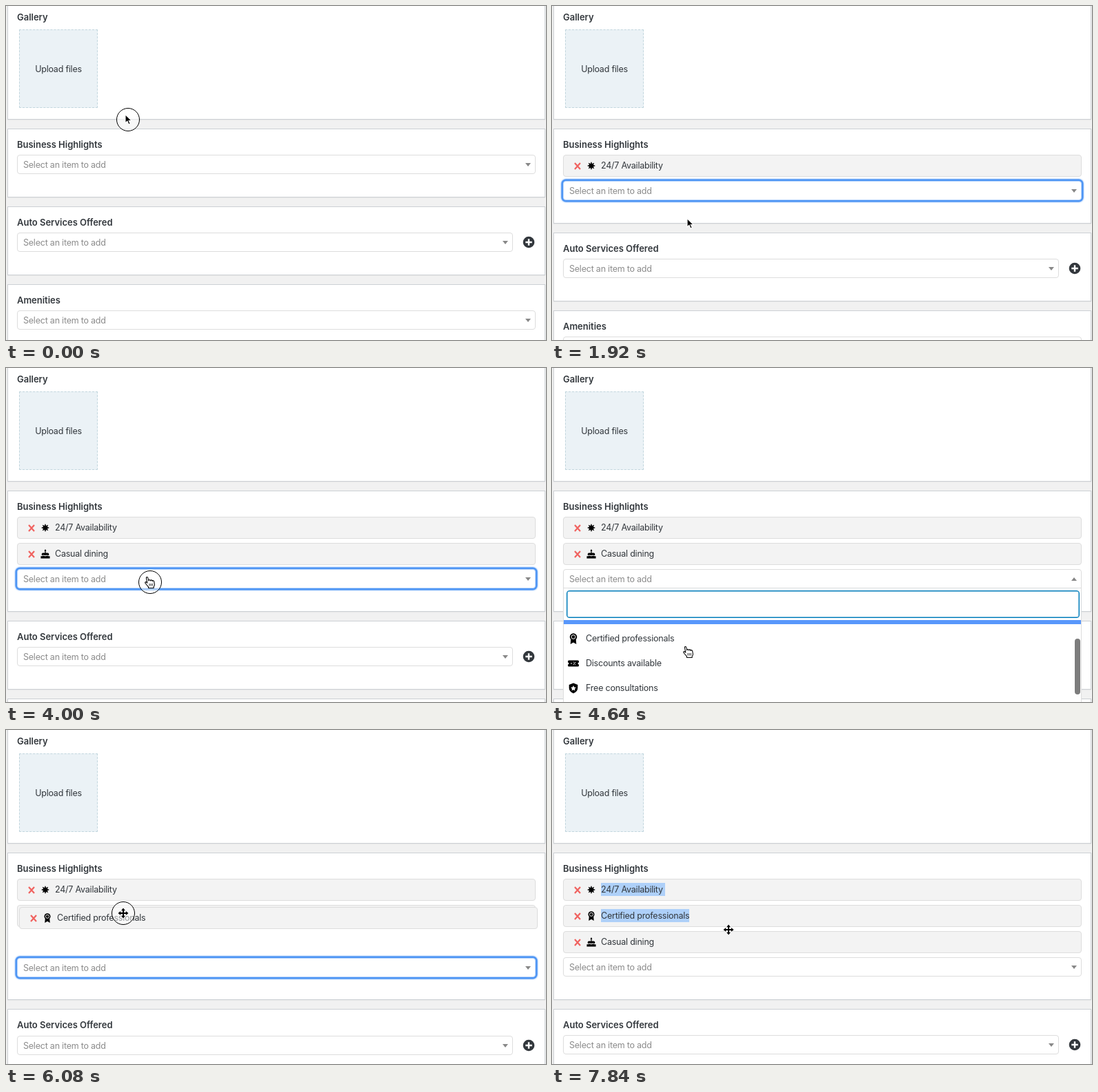
Recreate the animation shown at these times as an HTML page. Size 783 by 485 pixels, loop 8 s.

```html
<!DOCTYPE html>
<html lang="en">
<head>
<meta charset="utf-8">
<title>Listing editor</title>
<style>
  html, body { margin: 0; width: 100%; height: 100%; overflow: hidden; }
  body { position: relative; background: #f1f1f1; color: #32373c;
    font: 12.5px/28px Inter, Roboto, "Liberation Sans", sans-serif; letter-spacing: -.22px; }
  #stage { position: absolute; left: 0; top: 0; width: 783px; height: 485px; overflow: hidden; }
  #stage * { box-sizing: border-box; white-space: nowrap; }
  .panel, .panel > *, .select, .item, .drop, .search, .list, .row, .thumb, .icon, .cross, #pointer, #ring
    { position: absolute; }
  .panel { left: 2px; width: 780px; height: 100px; background: #fff; border: 1px solid #ccd0d4;
    box-shadow: 0 1px 1px rgba(0,0,0,.04); }
  .panel h2 { left: 13px; top: 8px; margin: 0; font-size: 13px; font-weight: 600; letter-spacing: -.02px; }
  .upload { left: 16px; width: 114px; height: 114px; border: 1px dashed #c2d6de; background: #ebf2f6;
    text-align: center; line-height: 113px; }
  .select { left: 16px; width: 752px; height: 28px; padding-left: 8px; border: 1px solid #ddd; border-radius: 4px;
    background: #fff; color: #8c8c8c; line-height: 28px; }
  .panel .select { left: 13px; top: 37px; }
  .panel .short { width: 719px; }
  .select::after { content: ""; position: absolute; right: 6px; top: 11px; border: 4px solid transparent;
    border-top: 5px solid #888; border-bottom: 0; }
  .select.open { border-radius: 4px 4px 0 0; }
  .select.open::after { border-top: 0; border-bottom: 5px solid #888; }
  .select.focus { border-color: #b9d5fb; box-shadow: 0 0 0 2.5px #4f96f4, 0 0 2px 3px #8dbcfa; }
  .plus { left: 746px; top: 43px; width: 18px; height: 18px; }
  .item { left: 16px; width: 752px; height: 32px; border: 1px solid #ddd; border-radius: 4px; background: #f3f3f3; }
  .item span { position: absolute; left: 54px; top: 5px; height: 19px; line-height: 19px; }
  .item .icon { left: 33px; top: 8px; width: 14px; height: 14px; }
  .item.marked span { background: #aed0f9; }
  .cross { left: 15px; top: 10px; width: 10px; height: 11px; }
  .drop { left: 16px; width: 752px; height: 252px; border: 1px solid #ddd; background: #fff; }
  .search { left: 4px; top: 3px; width: 744px; height: 40px; border: 1px solid #007cba; border-radius: 4px;
    box-shadow: inset 0 0 0 .5px #007cba; }
  .list { left: 0; top: 46px; width: 750px; height: 200px; overflow: hidden; }
  .row { left: 0; width: 750px; height: 30px; padding-left: 32px; line-height: 30px; }
  .row.hot { background: #5897fb; color: #fff; }
  .row .icon { left: 6px; top: 7px; width: 16px; height: 16px; color: #000; }
  .icon { color: #000; }
  .thumb { right: 1px; width: 8px; height: 81px; border-radius: 4px; background: #7d7d7d; }
  #ring { width: 34px; height: 34px; margin: -17px; border: 1px solid #000; border-radius: 50%;
    background: rgba(255,255,255,.5); }
  #pointer { width: 20px; height: 20px; margin: -10px; overflow: visible; }
</style>
</head>
<body>
<svg width="0" height="0" style="position:absolute">
  <symbol id="sun" viewBox="0 0 16 16">
    <circle cx="8" cy="8" r="4"/>
    <path d="M8 2v12M2 8h12M3.8 3.8l8.4 8.4M12.2 3.8l-8.4 8.4" stroke="#000" stroke-width="1.6"/>
  </symbol>
  <symbol id="cake" viewBox="0 0 16 16">
    <path d="M8 0l1.3 2.3a1.4 1.4 0 1 1-2.6 0zM7.3 4.5h1.4v1.7H12a2 2 0 0 1 2 2v1.6q-1.7 1.4-3.2-.4q-2.8 2-5.6 0q-1.500 1.800-3.200.4V8.200a2 2 0 0 1 2-2h3.300z"/>
    <path d="M.5 11.600q2.600.6 4.200-.7q3.300 1.800 6.600 0q1.600 1.300 4.200.7V15.500H.5z"/>
  </symbol>
  <symbol id="ribbon" viewBox="0 0 16 16">
    <path d="M4.300 9l-.6 7L8 13.500l4.300 2.500-.6-7z"/>
    <circle cx="8" cy="5.500" r="5.200"/>
    <circle cx="8" cy="5.500" r="2.900" fill="none" stroke="#fff"/>
  </symbol>
  <symbol id="ticket" viewBox="0 0 16 16">
    <path d="M1.500 3.500h13q1.500 0 1.500 1.500v1.500a1.500 1.500 0 0 0 0 3V11q0 1.500-1.500 1.500h-13Q0 12.500 0 11V9.500a1.500 1.500 0 0 0 0-3V5q0-1.500 1.500-1.500z"/>
    <path d="M4 8h2.200M7.800 10l3.400-4M8 6.200h1M10.200 9.700h1" stroke="#fff"/>
  </symbol>
  <symbol id="shield" viewBox="0 0 16 16">
    <path d="M8 .5l6.300 2.500v4.500q0 5.500-6.300 8q-6.300-2.500-6.300-8V3z"/>
    <path d="M8 4l1.200 2.600 2.800.3-2.100 1.900.6 2.800L8 10.200l-2.500 1.400.6-2.800L4 6.900l2.800-.3z" fill="#fff"/>
  </symbol>
  <symbol id="arrow" viewBox="0 0 20 20">
    <path d="M6 2.500v12.500l2.900-2.700 2 4.700 2.300-1-2-4.500h4z" fill="#000" stroke="#fff" stroke-width="1.100"/>
  </symbol>
  <symbol id="hand" viewBox="0 0 20 20">
    <path d="M7.500 18.500v-1.700L3.800 12.500q-1.800-2.200-.6-2.800q1-.4 2.600 1.500L4.500 4.500q-.3-1.800.9-2q1.200 0 1.500 1.500l.9 4q.1-1.500 1.200-1.500t1.400 1.500q.3-1.200 1.400-1.100t1.300 1.600q.5-1 1.400-.8t1.200 1.500l.7 4.300q0 1.500-1.300 3.300v1.700z" fill="#fff" stroke="#000" stroke-width="1.100" stroke-linejoin="round"/>
    <path d="M9 12v3.500M11.200 12v3.500M13.300 12v3.500" stroke="#000" stroke-width=".8"/>
  </symbol>
  <symbol id="move" viewBox="0 0 20 20">
    <path d="M10 2.500l3 3.700h-2v2.800h2.800V7l3.700 3-3.700 3v-2H11v2.800h2L10 17.500l-3-3.700h2V11H6.200v2L2.500 10l3.700-3v2H9V6.200H7z" fill="#000" stroke="#fff" stroke-width="1.600" paint-order="stroke"/>
  </symbol>
</svg>

<div id="stage">
  <div class="panel" style="top:-20px;height:185px">
    <h2 style="top:21px">Gallery</h2>
    <div class="upload" style="top:53px">Upload files</div>
  </div>
  <div class="panel" id="highlights" style="top:178px"><h2>Business Highlights</h2></div>
  <div class="panel" id="services">
    <h2>Auto Services Offered</h2>
    <div class="select short" id="serviceSelect">Select an item to add</div>
    <svg class="plus" id="plus" viewBox="0 0 18 18">
      <circle cx="9" cy="9" r="8.300" fill="#32373c"/>
      <path d="M9 4.300v9.400M4.300 9h9.400" stroke="#fff" stroke-width="2.400"/>
    </svg>
  </div>
  <div class="panel" id="amenities"><h2>Amenities</h2><div class="select">Select an item to add</div></div>
  <div class="select" id="picker">Select an item to add</div>
  <div id="items"></div>
  <div class="drop" id="drop">
    <div class="search"></div>
    <div class="list" id="list"></div>
    <div class="thumb" id="thumb"></div>
  </div>
  <div id="ring"></div>
  <svg id="pointer"><use id="shape" href="#arrow"/></svg>
</div>

<script>
const LOOP = 8000, STEP = 160, PITCH = 38, FIRST = 216;
const $ = id => document.getElementById(id);
const options = [
  ['sun', '24/7 Availability'], ['cake', 'Casual dining'], ['ribbon', 'Certified professionals'],
  ['ticket', 'Discounts available'], ['shield', 'Free consultations']
];

// Pointer waypoints: time, x, y
const path = [
  [0, 177, 165], [160, 177, 160], [320, 184, 138], [640, 188, 226], [960, 188, 231],
  [1120, 190, 305], [1600, 190, 305], [1920, 200, 316], [2240, 190, 269], [2400, 190, 269],
  [3040, 183, 375], [3520, 185, 392], [3680, 185, 392], [4000, 209, 311], [4160, 209, 311],
  [4480, 198, 412], [5600, 198, 412], [5920, 167, 301], [6080, 170, 266], [6400, 168, 243],
  [6720, 169, 259], [6880, 169, 259], [7200, 72, 221], [7520, 226, 247], [7680, 262, 282],
  [7840, 256, 290]
];
// Spans are [start, end)
const presses = [[0, 160], [800, 1120], [1440, 1600], [2240, 2560], [3520, 3680],
  [4000, 4320], [5440, 5600], [5920, 6880], [7200, 7840]];
const opened = [[960, 1600], [2400, 3680], [4160, 5600]];
const focused = [[1600, 2400], [3680, 4160], [5600, 7200]];
const shapes = [[0, 'arrow'], [640, 'hand'], [1600, 'arrow'], [2080, 'hand'], [5600, 'arrow'], [5760, 'move']];
const hovers = [[0, 0], [2720, 1], [3680, 0], [4320, 1], [4800, 2]];
const counts = [[0, 0], [1600, 1], [3680, 2], [5600, 3]];

const inside = (spans, t) => spans.some(([a, b]) => t >= a && t < b);
const latest = (marks, t) => marks.filter(m => m[0] <= t).pop()[1];
const show = (el, on) => { el.style.display = on ? '' : 'none'; };
const put = (el, x, y) => { el.style.left = x + 'px'; el.style.top = y + 'px'; };
const icon = name => `<svg class="icon"><use href="#${name}"/></svg>`;

function add(parent, cls, html) {
  const el = document.createElement('div');
  el.className = cls;
  el.innerHTML = html;
  return parent.appendChild(el);
}

const cross = '<svg class="cross" viewBox="0 0 10 11"><path d="M1 1l8 9M9 1l-8 9" stroke="#f0625f" stroke-width="2.200"/></svg>';
const items = options.slice(0, 3).map(([name, text], i) =>
  add($('items'), 'item', `${cross}${icon(name)}<span>${text}${i ? '' : '&nbsp;'}</span>`));
const rows = options.map(([name, text]) => add($('list'), 'row', icon(name) + text));

function pointerAt(t) {
  const i = path.findIndex(p => p[0] > t);
  if (i < 0) return path[path.length - 1].slice(1);
  const [a, b] = [path[i - 1], path[i]];
  const k = (t - a[0]) / (b[0] - a[0]), e = k * k * (3 - 2 * k);
  return [a[1] + (b[1] - a[1]) * e, a[2] + (b[2] - a[2]) * e].map(Math.round);
}

function draw(t) {
  const n = latest(counts, t), grow = n * PITCH;
  const drag = t >= 6080 && t < 6880, nudge = drag ? 1 : 0;
  const open = inside(opened, t), top = FIRST + grow + nudge;
  const [x, y] = pointerAt(t);

  $('highlights').style.height = 100 + grow + 'px';
  $('services').style.top = 291 + grow + 'px';
  $('serviceSelect').style.top = 37 + nudge + 'px';
  $('plus').style.top = 42 + nudge + 'px';
  $('amenities').style.top = 404 + grow + 'px';
  $('picker').style.top = top + 'px';
  $('picker').className = 'select' + (open ? ' open' : '') + (inside(focused, t) ? ' focus' : '');

  const slots = t >= 6400 ? [0, 2, 1] : [0, 1, 2];
  items.forEach((el, i) => {
    show(el, i < n);
    put(el, 16, FIRST + slots[i] * PITCH);
    el.classList.toggle('marked', i === 0 && t >= 7360 || i === 2 && t >= 7520);
  });
  if (drag) put(items[2], x - 151, y - 9);

  const scroll = t < 4480 || t >= 5600 ? 0 : t < 4640 ? 30 : 60;
  const hot = latest(hovers, t);
  show($('drop'), open);
  $('drop').style.top = top + 27 + 'px';
  rows.forEach((el, i) => {
    el.style.top = i * 36 - scroll + 'px';
    el.classList.toggle('hot', i === hot);
  });
  show($('thumb'), t >= 4480 && t < 4960);
  $('thumb').style.top = 48 + scroll * .42 + 'px';

  show($('ring'), inside(presses, t));
  put($('ring'), x, y);
  put($('pointer'), x, y);
  $('shape').setAttribute('href', '#' + latest(shapes, t));
}

const start = performance.now();
function tick() {
  const t = (performance.now() - start) % LOOP;
  draw(Math.floor(t / STEP) * STEP);
  requestAnimationFrame(tick);
}
tick();
</script>
</body>
</html>
```
